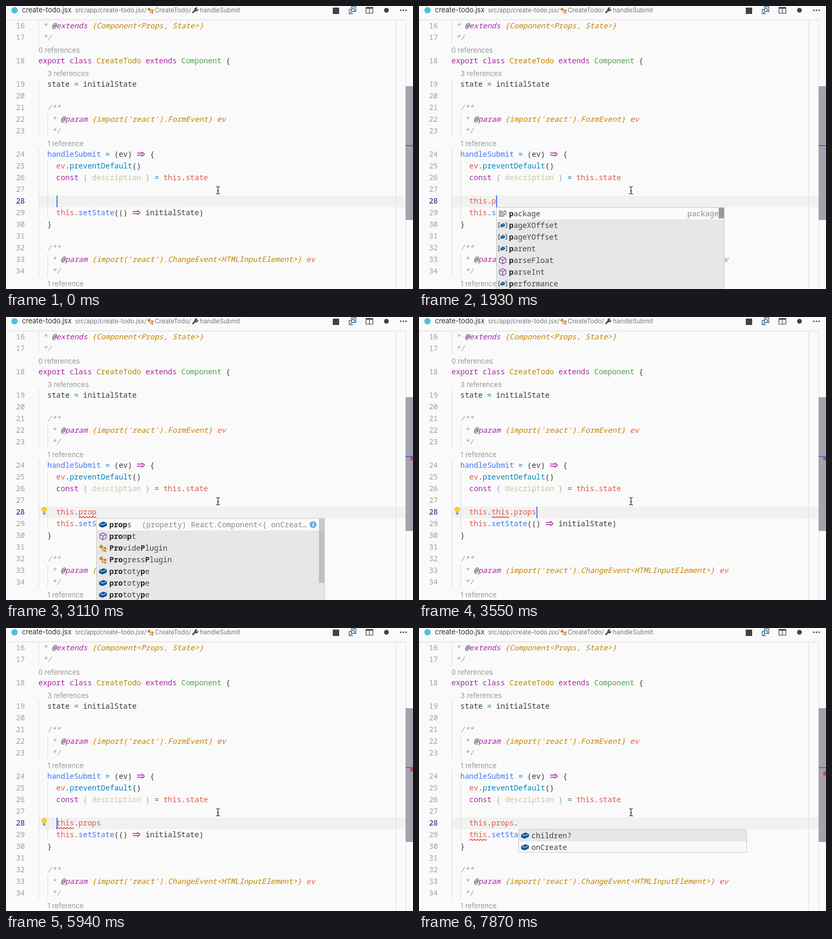
Recreate the animation shown at these times as an HTML page. Size 766 by 533 pixels, loop 8 s.

```html
<!DOCTYPE html>
<html lang="en">
<head>
<meta charset="utf-8">
<title>Code editor</title>
<style>
  html, body { margin: 0; width: 100%; height: 100%; overflow: hidden; background: #fafafa; }
  svg { display: block; width: 100%; height: 100%; }
  text { white-space: pre; font: 14px "Noto Sans Mono", "DejaVu Sans Mono", monospace; }
  .ui { font-family: Inter, "Open Sans", sans-serif; }
  .italic { font-style: italic; }
</style>
</head>
<body>
<svg viewBox="0 0 766 533" xmlns="http://www.w3.org/2000/svg">
  <g id="under"></g><g id="page"></g><g id="over"></g>
</svg>
<script>
const LOOP = 8000, CELL = 8.4, LEFT = 61, ROW = 22;
const colors = {
  f: '#383a42', k: '#a626a4', y: '#c18401', g: '#50a14f', b: '#4078f2', o: '#0184bc',
  r: '#e45649', c: '#a0a1a7', d: '#d3c0a0', n: '#a9a9ac'
};
const colX = col => LEFT + col * CELL;
const esc = s => s.replace(/&/g, '&amp;').replace(/</g, '&lt;');
const rect = (x, y, w, h, fill, more = '') =>
  `<rect x="${x}" y="${y}" width="${w}" height="${h}" fill="${fill}" ${more}/>`;
const path = (d, stroke, width = 1, fill = 'none') =>
  `<path d="${d}" fill="${fill}" stroke="${stroke}" stroke-width="${width}"/>`;
const text = (x, y, s, fill, more = '') =>
  `<text x="${x}" y="${y}" fill="${fill}" ${more}>${esc(s)}</text>`;
const ui = (x, y, s, fill, size) => text(x, y, s, fill, `class="ui" style="font-size:${size}px"`);

// Segments are split by "~"; the first letter picks the colour, upper case means italic, "=" draws an arrow.
function code(center, col, line) {
  return line.split('~').map(part => {
    const key = part[0], s = part.slice(1), x = colX(col);
    if (key === '=') {
      col += 2;
      return path(`M${x + 1} ${center - 2}h11M${x + 1} ${center + 2}h11M${x + 9.5} ${center - 4.5}L${x + 15} ${center}l-5.5 4.5`, colors.k, 1.3);
    }
    col += s.length;
    const italic = key < 'a' ? 'class="italic"' : '';
    return text(x, center + 5, s, colors[key.toLowerCase()], italic);
  }).join('');
}

const icons = {
  word: path('M-7-4.5h6M1-4.5h6M-7-1.5h9M4-1.5h3M-7 1.5h4M-1 1.5h8M-7 4.5h10', '#555', 1.4),
  variable: path('M-5-4.5h-2.5v9H-5M5-4.5h2.5v9H5', '#444', 1.2) +
    path('M-4-1L1-3.5 4-2V1L-1 3.5-4 2z', '#00539c', .5, '#00539c') + path('M-3-.8L-1 .2 3-1.8', '#e6e6e6', .8),
  method: path('M0-6.5L6-3.5V3.5L0 6.5-6 3.5V-3.5zM-6-3.5L0-.5 6-3.5M0-.5v7', '#7b3aa5', 1.2),
  type: path('M-7-2l4-4 3 3-4 4zM3-2l4 2-2 3-3.5-2zM3 4l3.5 1-2 2.5L1 5z', '#c27d1a', .5, '#c27d1a') +
    path('M-2 0h5M-1 0v5h3', '#c27d1a', 1.3),
  field: path('M-7-2L1-5.5 7-3V2L-1 5.5-7 3z', '#00539c', .6, '#00539c') + path('M-5.5-1.6L-1 .3 5.8-2.4', '#e8eef5', 1.1)
};
const icon = (name, x, y, scale = 1) => `<g transform="translate(${x} ${y}) scale(${scale})">${icons[name]}</g>`;

const lines = [
  [16, 37, 0, 'C * ~F@~Kextends~Y {Component<Props, State>}'],
  [17, 59, 0, 'C */'],
  [18, 103, 0, 'kexport class ~yCreateTodo~k extends ~gComponent~f {'],
  [19, 147, 2, 'fstate ~o=~f initialState'],
  [20, 169], [21, 191, 2, 'C/**'],
  [22, 213, 2, "C * ~F@~Kparam~Y {import('react').FormEvent}~R ev"],
  [23, 235, 2, 'C */'],
  [24, 279, 2, 'bhandleSubmit~o = ~f(ev) ~=~f {'],
  [25, 301, 4, 'rev~f.~opreventDefault~f()'],
  [26, 323, 4, 'kconst~n { ~ddescription~n } ~o= ~rthis~f.~rstate'],
  [27, 345], [28, 367],
  [29, 389, 4, 'rthis~f.~bsetState~f(() ~=~f initialState)'],
  [30, 411, 2, 'f}'], [31, 433], [32, 455, 2, 'C/**'],
  [33, 477, 2, "C * ~F@~Kparam~Y {import('react').ChangeEvent<HTMLInputElement>}~R ev"],
  [34, 499, 2, 'C */']
];
const lenses = [[61, 83, '0 references'], [78, 127, '3 references'], [78, 259, '1 reference'], [78, 523, '1 reference']];
const guides = [[61, 26, 70], [61, 136, 246], [61, 268, 510], [78, 202, 246], [78, 290, 400], [78, 466, 510]];

function header() {
  const ink = '#424242';
  return rect(0, 0, 766, 26, '#fafafa') + rect(0, 25, 752, 1, '#e9e9e9') + rect(0, 26, 752, 2, '#f0f0f0') +
    '<circle cx="16" cy="8" r="6" fill="#4dbfdc"/>' +
    ui(30, 12.2, 'create-todo.jsx', '#333', 13) +
    ui(130, 12.2, 'src/app/create-todo.jsx/', '#777', 11.7) + icon('type', 272, 8, .85) +
    ui(280, 12.2, 'CreateTodo/', '#777', 11.7) +
    path('M351 13l5-5', ink, 2.6) + path('M360 3.5a3.3 3.3 0 1 0 1.5 2.5l-2.5 1.5-1.5-1.5z', ink, 1, ink) +
    ui(365, 12.2, 'handleSubmit', '#777', 11.7) +
    rect(615, 3, 12, 12, ink) +
    path('M650 4V1.5h8.5v9H656M653 14.5h-7v-8h4', '#35658f', 1.3) +
    '<circle cx="653" cy="7.5" r="3" fill="none" stroke="#35658f" stroke-width="1.4"/>' +
    path('M651 10l-3 3', '#35658f', 1.5) +
    path('M677.5 3.5h13v10h-13zM684 3v10', ink, 1.2) + rect(677, 2, 14, 3, ink) +
    '<circle cx="716" cy="8" r="4.5" fill="#424242"/>' +
    [743, 748, 753].map(x => `<circle cx="${x}" cy="8" r="1.5" fill="${ink}"/>`).join('');
}

function page() {
  return guides.map(([x, top, end]) => rect(x, top, 1, end - top, '#dcdcdc')).join('') +
    rect(733, 26, 1, 507, '#dedede') + rect(752, 0, 1, 533, '#e2e2e2') +
    lines.map(([number, y, col, line]) =>
      text(35.5, y + 5, String(number), number === 28 ? '#0b216f' : '#a0a0a2', 'text-anchor="end"') +
      (line ? code(y, col, line) : '')).join('') +
    lenses.map(([x, y, s]) => ui(x, y + 4.8, s, '#999', 13)).join('') +
    rect(752, 151, 14, 252, '#a2a3ad') + rect(752, 262, 14, 2, '#526eba') +
    path('M395.5 340q3.5 0 3.5 2.5 0-2.5 3.5-2.5M399 342v10.5M395.5 354q3.5 0 3.5-2.5 0 2.5 3.5 2.5M397 348h4', '#222', 1.2) +
    header();
}

// In item labels "*" toggles the bold matched letters.
const lists = {
  keyword: { items: [['word', '*thi*s']] },
  globals: { thumb: 20, items: [['variable', 'applicationCache'], ['method', 'addEventListener'], ['method', 'alert'],
    ['method', 'atob'], ['method', 'blur'], ['method', 'btoa'], ['variable', 'caches']] },
  p: { thumb: 20, detail: 'package', detailRight: true, items: [['word', '*p*ackage'], ['variable', '*p*ageXOffset'],
    ['variable', '*p*ageYOffset'], ['variable', '*p*arent'], ['method', '*p*arseFloat'],
    ['method', '*p*arseInt'], ['variable', '*p*erformance']] },
  prop: { thumb: 121, detail: '(property) React.Component<{ onCreat…', items: [['field', '*prop*s'], ['method', '*pro*m*p*t'],
    ['type', '*Pro*vide*P*lugin'], ['type', '*Pro*gress*P*lugin'],
    ...Array(3).fill(['field', '*pro*toty*p*e'])] },
  members: { items: [['field', 'children?'], ['field', 'onCreate']] },
  membersInfo: { detail: '(property) children?: React.R…', items: [['field', 'children?'], ['field', 'onCreate']] }
};

function popup({ list, at, pick, fade }) {
  const { items, thumb, detail, detailRight } = lists[list];
  const x = Math.round(colX(at)), top = 380, width = 430;
  const height = items.length * ROW + (items.length > 6 ? 9 : -1);
  let out = rect(x, top, width, height, '#e7e7e7') +
    rect(x, top + pick * ROW, width, ROW, '#fafafa') +
    rect(x + .5, top - .5, width - 1, height, 'none', 'stroke="#c8c8c8"');
  items.forEach(([kind, label], i) => {
    const y = top + i * ROW + 11;
    const spans = label.split('*').map((s, n) => n % 2 ? `<tspan font-weight="700" fill="#222">${s}</tspan>` : s).join('');
    out += icon(kind, x + 12.5, y) + `<text x="${x + 24.5}" y="${y + 4.5}" fill="#444">${spans}</text>`;
    if (i !== pick || !detail) return;
    const labelEnd = x + 24.5 + label.replace(/\*/g, '').length * CELL;
    out += text(detailRight ? x + 360 : labelEnd + 19, y + 4.5, detail, '#8b8b8d');
    if (!detailRight) {
      out += `<circle cx="${x + 408}" cy="${y}" r="6.5" fill="#63b1e5"/>` +
        rect(x + 407.2, y - 1, 1.8, 5, '#fff') + rect(x + 407.2, y - 4, 1.8, 1.8, '#fff');
    }
  });
  if (thumb) out += rect(x + 419, top, 10, thumb, '#98989b', `opacity="${fade}"`);
  return out;
}

function squiggle([col, count, line]) {
  const y = line === 29 ? 399 : 377, end = colX(col + count);
  let x = colX(col), d = `M${x} ${y + 1.2}`;
  for (let up = true; x + 3 <= end; up = !up) d += `L${x += 3} ${y + (up ? -1.2 : 1.2)}`;
  return path(d, '#e3342f', 1.2);
}

const bulb = '<circle cx="72" cy="362.5" r="4.8" fill="#fcc419"/>' + rect(70, 365, 4, 3, '#fcc419') +
  path('M69.5 369h5M70 371.2h4', '#555', 1.2) + path('M70.5 362l1.5 2 1.5-2', '#fff3c4', 1);

const typed = (s, more) => ({ text: s, col: 4 + s.length, on: true, ...more });
const openList = (list, at, more) => ({ list, at, pick: 0, fade: 1, ...more });
const timeline = [
  [0, typed('', { list: null, squiggle: null, mark: 0, bulb: false, select: null, highlight: null })],
  [150, typed('t')], [300, typed('th')], [600, typed('thi')],
  [750, openList('keyword', 7)], [890, typed('this')], [1040, { list: null }],
  [1190, { mark: 264 }], [1340, { squiggle: [8, 1, 28] }],
  [1480, typed('this.', { squiggle: null })], [1630, openList('globals', 9)],
  [1780, typed('this.p', { list: null })], [1930, openList('p', 10, { mark: 0 })],
  [2230, typed('this.pro', openList('prop', 12))], [2370, typed('this.prop', { at: 13 })],
  [2670, { squiggle: [9, 4, 28], mark: 264 }], [2820, { bulb: true, on: false }],
  [3110, { fade: .5 }], [3260, { fade: 0, on: true }],
  [3550, typed('this.this.props', { list: null })], [3700, { bulb: false }],
  [3990, { on: false }], [4440, { on: true }],
  [4890, { col: 14 }], [5040, { col: 9 }], [5340, { bulb: true }],
  [5640, { col: 4, select: [4, 5] }],
  [5940, typed('this.props', { col: 4, select: null, squiggle: [4, 4, 28] })],
  [6090, { bulb: false }], [6240, { col: 14 }], [6380, { squiggle: null, mark: 0 }],
  [6680, { on: false }], [6970, { highlight: [9, 5] }],
  [7120, typed('this.props.', { highlight: null, ...openList('members', 15) })],
  [7420, { squiggle: [4, 4, 29], mark: 270 }], [7570, { on: false, list: 'membersInfo' }],
  [7870, { list: 'members', pick: 1 }]
];

const layer = id => document.getElementById(id);
const block = ([col, count], fill) => rect(colX(col), 357, count * CELL, ROW, fill);

function draw(s) {
  const words = /^thi?$|^t$/.test(s.text) ? 'f' + s.text
    : s.text.split('.').map(w => 'r' + w).join('~f.~');
  layer('under').innerHTML = rect(0, 0, 766, 533, '#fafafa') + rect(62, 357, 704, ROW, '#f1f1f1') +
    (s.select ? block(s.select, '#dfdfe1') : '') + (s.highlight ? block(s.highlight, '#e4e4e4') : '');
  layer('over').innerHTML = code(367, 4, words) +
    (s.squiggle ? squiggle(s.squiggle) : '') +
    (s.on ? rect(Math.round(colX(s.col)), 357, 2, ROW, '#526fff') : '') +
    (s.mark ? rect(761, s.mark, 5, s.mark === 264 ? 6 : 8, '#cc4a58') : '') +
    (s.highlight ? rect(757, 264, 5, 6, '#85858f') : '') +
    (s.bulb ? bulb : '') + (s.list ? popup(s) : '');
}

layer('page').innerHTML = page();
let shown = -1;
function tick() {
  const time = performance.now() % LOOP;
  const past = timeline.filter(([start]) => start <= time);
  if (past.length !== shown) {
    shown = past.length;
    draw(Object.assign({}, ...past.map(([, change]) => change)));
  }
  requestAnimationFrame(tick);
}
tick();
</script>
</body>
</html>
```
